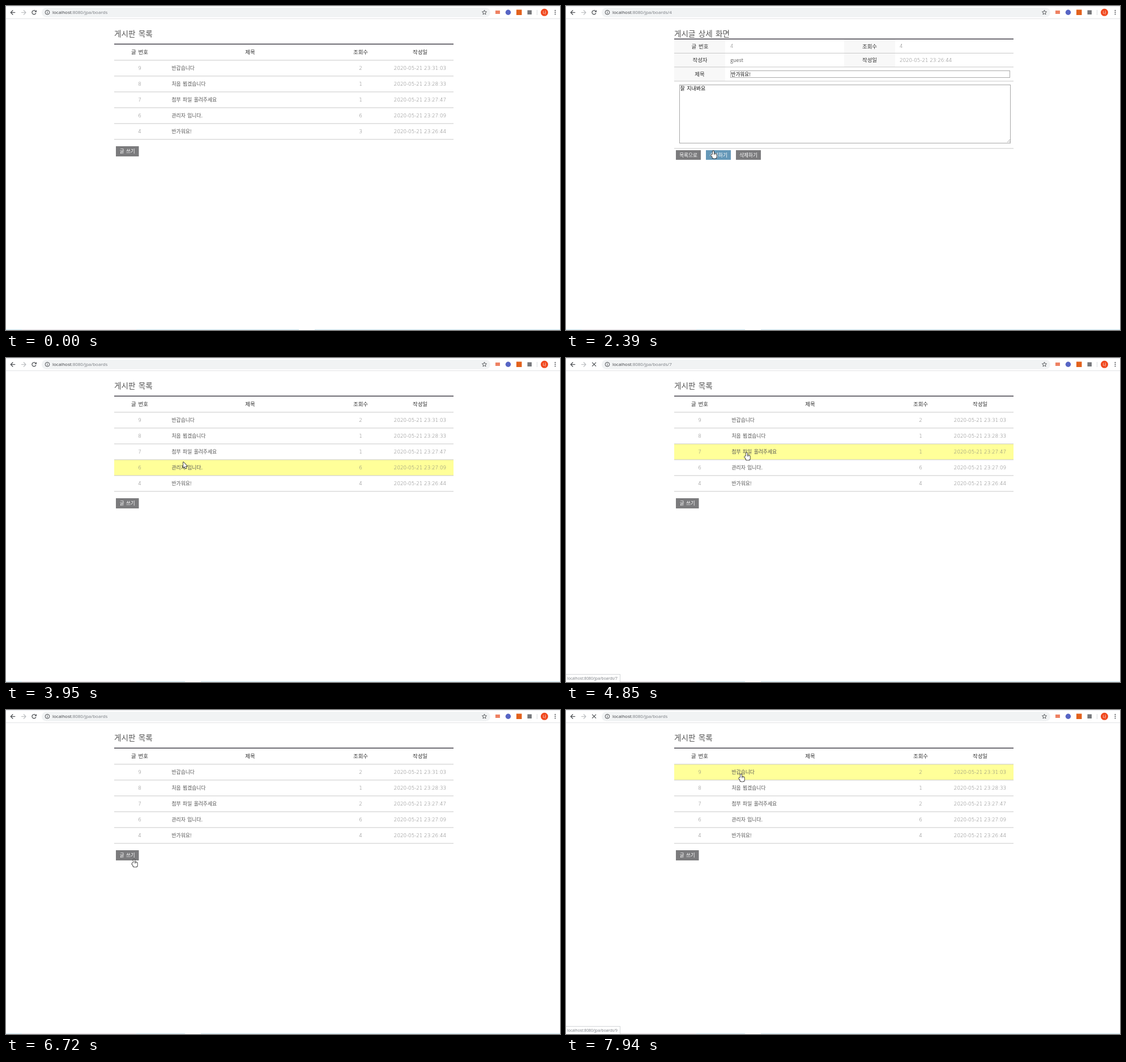
Recreate the animation shown at these times as an HTML page with a canvas. Size 978 by 573 pixels, loop 8000 ms.

```html
<!DOCTYPE html>
<html lang="ko">
<head>
<meta charset="utf-8">
<title>게시판</title>
<style>
html, body { margin: 0; width: 100%; height: 100%; overflow: hidden; background: #fff; }
canvas { display: block; width: 978px; height: 573px; }
</style>
</head>
<body>
<canvas id="stage" width="978" height="573"></canvas>
<script>
const g = document.getElementById('stage').getContext('2d');
const LOOP = 8000, FIRST = 165, STEP = 111;
const KR = '"Noto Sans CJK KR", "Noto Sans CJK JP", "Noto Sans CJK", sans-serif';
const UI = '"Open Sans", "Noto Sans", sans-serif';
const WIDE = '"DejaVu Sans", sans-serif';
const LEFT = 191, WIDTH = 599, ROW = 28, ROWS_TOP = 96;
const INK = '#4a4d51', FAINT = '#bcbec1', RULE = '#c8c8c8';

const posts = [
  { id: 9, title: '반갑습니다', views: 2, time: '23:31:03' },
  { id: 8, title: '처음 뵙겠습니다', views: 1, time: '23:28:33' },
  { id: 7, title: '첨부 파일 올려주세요', views: 1, time: '23:27:47', body: '부탁드립니다' },
  { id: 6, title: '관리자 입니다.', views: 6, time: '23:27:09' },
  { id: 4, title: '반가워요!', views: 3, time: '23:26:44', body: '잘 지내봐요' }
];

// a visit without an id is the list
const visits = [
  { click: 0, load: 0 },
  { click: 1400, load: 1520, id: 4 },
  { click: 3290, load: 3390 },
  { click: 4850, load: 4960, id: 7 },
  { click: 6600, load: 6720 },
  { click: 7940, load: 8050 }
];

const link = (i, x = 319) => ({ x, y: 113 + 27 * i });
const entry = { x: 888, y: 558 };
const trips = [
  { depart: 180, arrive: 1290, to: link(4) },
  { depart: 2060, arrive: 2390, to: { x: 260, y: 256 } },
  { depart: 2390, arrive: 2630, to: { x: 219, y: 270 } },
  { depart: 3500, arrive: 3730, to: { x: 290, y: 247 } },
  { depart: 3730, arrive: 4390, to: link(2) },
  { depart: 5180, arrive: 5950, to: { x: 226, y: 264 } },
  { depart: 6720, arrive: 7720, to: link(0, 309) }
];

const easeOut = u => 1 - (1 - u) ** 4;
const inBox = (p, x, y, w, h) => p && p.x >= x && p.x <= x + w && p.y >= y && p.y <= y + h;
const views = (p, t) => p.views + visits.filter(v => v.id === p.id && t >= v.load).length;
const stamp = p => '2020-05-21 ' + p.time;

// the cursor is sampled nine times a second
function pointer(time) {
  if (time < trips[0].depart) return null;
  const t = FIRST + STEP * Math.floor((time - FIRST) / STEP);
  let p = { ...entry };
  for (const { depart, arrive, to } of trips) {
    if (t <= depart) break;
    const k = easeOut(Math.min(1, (t - depart) / (arrive - depart)));
    p = { x: p.x + (to.x - p.x) * k, y: p.y + (to.y - p.y) * k, resting: t >= arrive };
  }
  return { ...p, x: Math.round(p.x), y: Math.round(p.y) };
}

function rect(x, y, w, h, color) {
  g.fillStyle = color;
  g.fillRect(x, y, w, h);
}

function frame(x, y, w, h, color) {
  g.strokeStyle = color;
  g.lineWidth = 1;
  g.strokeRect(x + .5, y + .5, w - 1, h - 1);
}

function disc(x, y, r, color) {
  g.fillStyle = color;
  g.beginPath();
  g.arc(x, y, r, 0, 7);
  g.fill();
}

function arc(x, y, r, from, to, width) {
  g.strokeStyle = INK;
  g.lineWidth = width;
  g.beginPath();
  g.arc(x, y, r, from, to);
  g.stroke();
}

function poly(points, closed) {
  g.beginPath();
  for (let i = 0; i < points.length; i += 2) g.lineTo(points[i], points[i + 1]);
  if (closed) g.closePath();
}

function line(points, color, width = 1.2) {
  poly(points);
  g.strokeStyle = color;
  g.lineWidth = width;
  g.stroke();
}

// y is the middle of the line of text
function text(s, x, y, size, color, { align = 'left', weight = 300, font = KR } = {}) {
  g.font = `${weight} ${size}px ${font}`;
  g.wordSpacing = font === KR ? size * .16 + 'px' : '0px';
  g.textAlign = align;
  g.fillStyle = color;
  g.fillText(s, x, y + size * .37);
}

const heading = s => text(s, LEFT, 48.5, 13.6, '#555');
const label = (s, x, y) => text(s, x, y, 9.5, '#333', { align: 'center', weight: 500 });
const value = (s, x, y, align) => text(s, x, y, 8.7, '#777', { align, font: WIDE, weight: 200 });
const rule = y => rect(LEFT, y - .6, WIDTH, 1, RULE);
const topRule = y => rect(LEFT, y - .3, WIDTH, 1.4, '#33303a');

function button(s, x, y, w, h, hot) {
  rect(x, y, w, h, hot ? '#6598b8' : '#7b7b7d');
  text(s, x + w / 2, y + h / 2, 8.6, '#fff', { align: 'center' });
}

function star(x, y) {
  const points = [];
  for (let i = 0; i < 10; i++) {
    const r = i % 2 ? 1.9 : 4.3, a = i * Math.PI / 5 - Math.PI / 2;
    points.push(x + r * Math.cos(a), y + r * Math.sin(a));
  }
  poly(points, true);
  g.strokeStyle = INK;
  g.lineWidth = .9;
  g.stroke();
}

function navArrow(x, dir, color) {
  line([x - 4 * dir, 11.5, x + 4 * dir, 11.5], color);
  line([x, 7.5, x + 4 * dir, 11.5, x, 15.5], color);
}

function reload() {
  arc(49.5, 11.3, 3.5, .3, 5.4, 1.3);
  g.fillStyle = INK;
  poly([54, 7, 54, 10.8, 50.2, 10.8], true);
  g.fill();
}

function stop() {
  for (const d of [-3.4, 3.4]) line([49.6 - d, 7.8, 49.6 + d, 14.6], INK);
}

function toolbar(path, busy) {
  rect(0, 0, 978, 1, '#e3e6ea');
  rect(0, 22, 978, 1, '#e2e3e5');
  g.fillStyle = '#f1f3f4';
  g.beginPath();
  g.roundRect(63, 3, 792, 17, 8.5);
  g.fill();

  navArrow(12.3, -1, INK);
  navArrow(31, 1, FAINT);
  (busy ? stop : reload)();

  arc(73, 11.3, 3.8, 0, 7, 1);
  rect(72.5, 10.8, 1, 2.6, INK);
  rect(72.5, 9, 1, 1, INK);

  const font = { font: UI, weight: 400 };
  text('localhost', 82, 11.2, 8, '#3a3c40', font);
  const w = g.measureText('localhost').width;
  text(':8080' + path, 82 + w, 11.2, 8, '#777b80', font);

  star(844.5, 11.5);
  rect(864, 8, 8, 6, '#ee8263');
  disc(886.5, 11.3, 4.7, '#5765c4');
  rect(901, 6.5, 9.5, 9.5, '#e2611c');
  rect(920.5, 7.5, 7.5, 7.5, '#77797d');
  rect(937, 7, 1, 9, '#d8dadd');
  disc(950.5, 11.3, 6.5, '#f0481e');
  text('나', 950.5, 11.3, 6.5, '#fff', { align: 'center' });
  for (const i of [-1, 0, 1]) disc(969.5, 11.3 + 3.3 * i, 1, INK);
}

function listPage(t, hotRow) {
  heading('게시판 목록');
  topRule(67);
  label('글 번호', 236, 81.5);
  label('제목', 431, 81.5);
  label('조회수', 626, 81.5);
  label('작성일', 731, 81.5);
  posts.forEach((post, i) => {
    const top = ROWS_TOP + ROW * i, mid = top + 13.5;
    if (i === hotRow) rect(LEFT, top, WIDTH, ROW, '#ffff99');
    value(post.id, 236, mid, 'center');
    text(post.title, 292.5, mid, 8.8, '#555');
    value(views(post, t), 626, mid, 'center');
    value(stamp(post), 731, mid, 'center');
  });
  for (let i = 0; i <= posts.length; i++) rule(ROWS_TOP + ROW * i);
  button('글 쓰기', 194, 248, 40.5, 18);
}

function detailPage(t, post, p) {
  heading('게시글 상세 화면');
  for (const x of [LEFT, 491]) rect(x, 59, 90, 49, '#f8f8f8');
  rect(LEFT, 108, 90, 25, '#f8f8f8');
  topRule(58);
  for (const y of [83.5, 108, 133, 252]) rule(y);

  label('글 번호', 236.5, 71);
  label('조회수', 536, 71);
  label('작성자', 236.5, 95.5);
  label('작성일', 536, 95.5);
  label('제목', 236, 120);
  value(post.id, 290, 71);
  value(views(post, t), 589, 71);
  text('guest', 290, 95.5, 9, '#666');
  value(stamp(post), 589, 95.5);

  frame(290, 114, 494, 13, '#aaa');
  text(post.title, 291.5, 121, 8.6, '#111', { weight: 400 });
  frame(200, 139, 585, 104, '#a6a6a6');
  text(post.body, 201.5, 145.5, 9, '#111', { weight: 400 });
  for (const d of [2, 5]) line([784 - d, 241, 784, 241 - d], '#999', .8);

  ['목록으로', '수정하기', '삭제하기'].forEach((s, i) => {
    const x = 194 + 53 * i;
    button(s, x, 255, 44, 17, inBox(p, x, 255, 44, 17));
  });
}

function outline() {
  g.strokeStyle = '#222';
  g.lineWidth = 1.6;
  g.lineJoin = 'round';
  g.stroke();
  g.fillStyle = '#fff';
  g.fill();
}

function arrow() {
  poly([0, 0, 0, 9.8, 2.2, 7.8, 3.8, 11.4, 5.4, 10.7, 3.8, 7.2, 6.8, 7.1], true);
  outline();
}

function hand() {
  g.beginPath();
  g.roundRect(-1.1, .4, 2.2, 9, 1.1);
  g.roundRect(-1.8, 5, 7.6, 8.4, 2.4);
  g.roundRect(-3.8, 6.8, 4, 2.6, 1.2);
  outline();
  for (const x of [1.4, 3.2]) line([x, 5, x, 7.4], '#222', .7);
}

function beam() {
  line([0, -2.4, 0, 9.4], '#222', .9);
  for (const y of [-2.7, 9.7]) line([-2.5, y, 2.5, y], '#222', .9);
}

function cursor(p, shape) {
  g.save();
  g.translate(p.x, p.y);
  shape();
  g.restore();
}

function taskbar(t) {
  rect(0, 572, 978, 1, '#c6e2ec');
  rect(28, 572, 202, 1, '#e2dde2');
  rect(t < 960 ? 517 : 316, 572, 28, 1, '#fff');
}

function hintBox(id) {
  rect(0, 559, 96, 14, '#d4d6d8');
  rect(0, 560, 95, 13, '#fff');
  text('localhost:8080/jpa/boards/' + id, 2, 566, 6.8, '#777b80', { font: UI, weight: 400 });
}

function draw(t) {
  const p = pointer(t);
  const clicked = visits.filter(v => t >= v.click).pop();
  const loaded = visits.filter(v => t >= v.load).pop();
  const open = posts.find(post => post.id === loaded.id);
  const hotRow = !open && inBox(p, LEFT, ROWS_TOP, WIDTH, ROW * posts.length - 1)
    ? Math.floor((p.y - ROWS_TOP) / ROW) : -1;
  const onLink = hotRow >= 0 && p.resting;
  const onButton = open
    ? [0, 1, 2].some(i => inBox(p, 194 + 53 * i, 255, 44, 17))
    : inBox(p, 194, 248, 40, 18);

  rect(0, 0, 978, 573, '#fff');
  toolbar('/jpa/boards' + (clicked.id ? '/' + clicked.id : ''), clicked !== loaded);
  if (open) detailPage(t, open, p);
  else listPage(t, hotRow);
  taskbar(t);
  if (onLink) hintBox(posts[hotRow].id);
  if (p) {
    const inBody = open && inBox(p, 200, 139, 585, 104);
    cursor(p, onLink || onButton ? hand : inBody ? beam : arrow);
  }
}

const begin = performance.now();
function tick() {
  draw((performance.now() - begin) % LOOP);
  requestAnimationFrame(tick);
}
tick();
</script>
</body>
</html>
```
